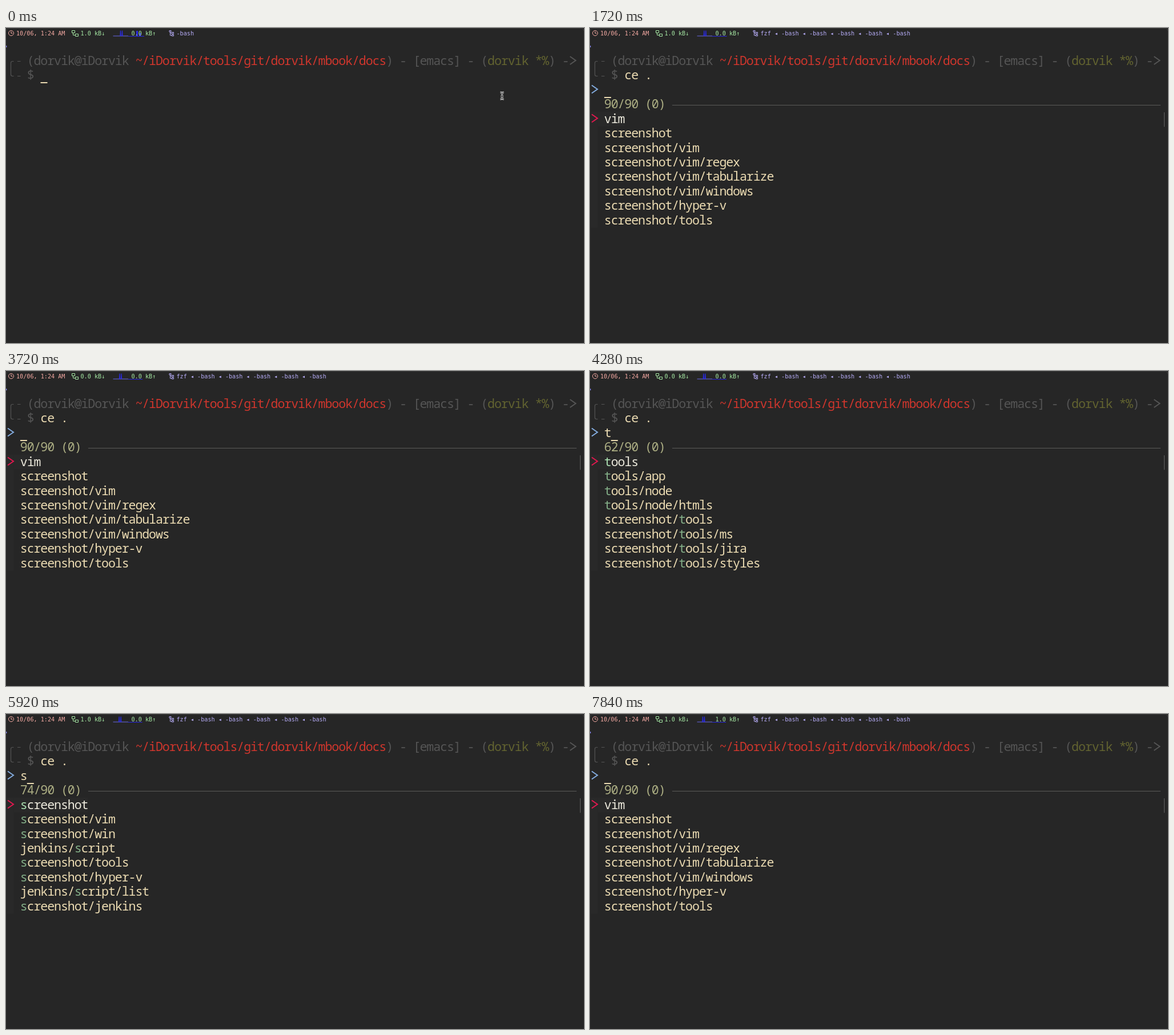
An HTML page with a canvas for the animation above (8000 ms loop, 1012 by 553 pixels).

```html
<!DOCTYPE html>
<html lang="en">
<head>
<meta charset="utf-8">
<title>Fuzzy directory picker</title>
<style>
html, body { margin: 0; width: 100%; height: 100%; overflow: hidden; background: #262626; }
canvas { display: block; }
</style>
</head>
<body>
<canvas id="stage" width="1012" height="553"></canvas>
<script>
const ctx = document.getElementById('stage').getContext('2d');
const LOOP = 8000, CELL = 11.86, LEFT = 1.6, ROW = 25.45, TOP = 45.2;
const TERM_FONT = '500 21.6px "Noto Sans Mono", "DejaVu Sans Mono", monospace';
const BAR_FONT = '10.13px "DejaVu Sans Mono", monospace';
const C = {
  bg: '#262626', raised: '#292929', gray: '#555555', red: '#cf362d', olive: '#626330',
  cream: '#ebdbb2', bright: '#ece9dc', green: '#83ae87', lime: '#aadfb0',
  info: '#acae83', rule: '#5a5a58', blue: '#83acdf', pink: '#e2184f',
  salmon: '#f5aaa3', mint: '#a6e9a4', violet: '#b5abf5', graph: '#2a2ae0'
};

// Edits of the query: start, ms per key, word, +1 typing or -1 deleting
const EDITS = [
  [1800, 86, 'jenkins', 1], [2800, 130, 'jenkins', -1],
  [4240, 80, 'tools', 1], [5520, 70, 'tools', -1],
  [5860, 75, 'script', 1], [6840, 90, 'script', -1]
];
const shots = names => names.split(' ').map(n => 'screenshot/' + n);
const jenkins = names => names.split(' ').map(n => 'jenkins/' + n);
const LISTS = {
  '': ['vim', 'screenshot', ...shots('vim vim/regex vim/tabularize vim/windows hyper-v tools')],
  j: ['jenkins', ...jenkins('config script plugins script/list jenkinsfile ci.jenkins.io script/list/plugins')],
  t: ['tools', 'tools/app', 'tools/node', 'tools/node/htmls', ...shots('tools tools/ms tools/jira tools/styles')],
  s: ['screenshot', ...shots('vim win'), 'jenkins/script', ...shots('tools hyper-v'), 'jenkins/script/list', 'screenshot/jenkins'],
  scri: [...jenkins('script script/list script/list/plugins'), ...shots('vim win jenkins win/powershell jenkins/exception')],
  scrip: [...jenkins('script script/list script/list/plugins'), ...shots('win/powershell jenkins/exception')],
  script: [...jenkins('script script/list script/list/plugins'), ...shots('jenkins/exception')]
};
const COUNTS = {
  '': 90, j: 24, je: 13, t: 62, to: 27, too: 9, tool: 8, tools: 8,
  s: 74, sc: 48, scr: 40, scri: 14, scrip: 5, script: 4
};

const col = n => LEFT + n * CELL;
const rowTop = r => TOP + r * ROW;

// Monospace grid: every glyph is centred in its cell
function grid(text, x, y, step, color) {
  ctx.textAlign = 'center';
  [...text].forEach((ch, i) => {
    ctx.fillStyle = typeof color === 'function' ? color(i) : color;
    if (ch !== ' ') ctx.fillText(ch, x + (i + 0.5) * step, y);
  });
}
function term(text, column, row, color) {
  ctx.font = TERM_FONT;
  grid(text, col(column), rowTop(row) + 19.6, CELL, color);
}
function bar(text, x, color) {
  ctx.font = BAR_FONT;
  grid(text, x, 13, 6.1, color);
}
function rect(x, y, w, h, color) {
  ctx.fillStyle = color;
  ctx.fillRect(x, y, w, h);
}
function path(d, color, width) {
  ctx.strokeStyle = color;
  ctx.lineWidth = width;
  ctx.stroke(new Path2D(d));
}
const chevron = (x, y, color) => path(`M${x} ${y - 7}l10 7l-10 7`, color, 2);
const cursor = (column, row) => rect(col(column) - 0.4, Math.round(rowTop(row + 1)) - 1, 12, 2, C.cream);

function queryAt(t) {
  const edit = EDITS.filter(e => e[0] <= t).pop();
  if (!edit) return '';
  const [start, pace, word, dir] = edit;
  const keys = Math.min(word.length, Math.floor((t - start) / pace) + 1);
  return word.slice(0, dir > 0 ? keys : word.length - keys);
}

function matchSet(item, query) {
  const hits = new Set();
  let at = item.startsWith(query) ? 0 : item.indexOf('/' + query) + 1;
  for (const ch of query) {
    at = item.indexOf(ch, at);
    if (at < 0) break;
    hits.add(at++);
  }
  return hits;
}

function drawStatus(t) {
  path('M4.5 9a4.5 4.5 0 1 0 9 0a4.5 4.5 0 1 0 -9 0M9 6v3.2h2.6', C.salmon, 1);
  bar('10/06, 1:24 AM', 18, C.salmon);

  path('M115.5 4.5h5v4h-5zM121.5 10.5h5v4h-5zM117.5 9v3.5h4', C.mint, 1);
  const down = t < 2520 || (t >= 4920 && t < 6000) || t >= 6960;
  bar((down ? '1.0' : '0.0') + ' kB↓', 130.5, C.mint);

  const x = 200.5 - 0.4 * t / 1000;
  rect(187.5, 13.5, 26.5, 1, '#6868e8');
  rect(214, 14, (t < 560 ? 28 : 26) - t / 4000, 1, C.graph);
  ctx.fillStyle = C.graph;
  for (const dx of [0, 3]) ctx.fill(new Path2D(`M${x + dx - 1.2} 14l.6 -9.5h1.2l.6 9.5z`));
  if (t < 560) rect(228, 5, 3, 9, C.graph), rect(233, 9, 3, 5, C.graph);
  bar((t >= 6960 ? '1.0' : '0.0') + ' kB↑', 219.5, C.mint);

  path('M286 4.5h3v2.5h-3zM287.5 7v6h3M287.5 9h3M290.5 7.5h3v2.5h-3zM290.5 11.5h3v2.5h-3z', C.violet, 1);
  bar(t < 800 ? '-bash' : 'fzf' + ' ◂ -bash'.repeat(5), 298.5, C.violet);
}

function drawPrompt(t) {
  path('M13.5 58.5h-2q-3 0-3 3V81.5q0 3 3 3h2M20 58.5h5.5M20 84.5h5.5', C.gray, 1.2);
  const parts = [
    ['(dorvik@iDorvik ', C.gray],
    ['~/iDorvik/tools/git/dorvik/mbook/docs', C.red],
    [') - [emacs] - (', C.gray],
    ['dorvik *%', C.olive],
    [') -', C.gray]
  ];
  let column = 3;
  for (const [text, color] of parts) {
    term(text, column, 0, color);
    column += text.length;
  }
  chevron(987.5, 57, C.gray);
  term('$', 3, 1, C.gray);
  const typed = 'ce .'.slice(0, t < 40 ? 0 : Math.floor((t - 40) / 120) + 1);
  term(typed, 5, 1, C.cream);
  if (t < 560) cursor(5 + typed.length, 1);
}

function drawPicker(t) {
  const query = queryAt(t), filter = queryAt(t - 40);
  chevron(3, 107.5, C.blue);
  term(query, 2, 2, C.cream);
  if (t >= 720) {
    const count = COUNTS[filter] ?? 11;
    const info = `${count}/90 (0) `;
    const items = LISTS[filter] || LISTS[filter[0]];
    term(info, 2, 3, C.info);
    const ruleX = col(2 + info.length);
    rect(ruleX, 135, 999 - ruleX, 1, C.rule);
    rect(2, 147, CELL, items.length * ROW, C.raised);
    rect(col(1), 147, CELL * (1 + items[0].length), ROW, C.raised);
    chevron(3, 158.5, C.pink);
    items.forEach((item, i) => {
      const hits = matchSet(item, filter);
      const [plain, match] = i ? [C.cream, C.green] : [C.bright, C.lime];
      term(item, 2, 4 + i, n => hits.has(n) ? match : plain);
    });
    if (count > 8) rect(1005, 148, 1, Math.max(1, Math.floor(64 / count)) * ROW, '#626262');
  }
  cursor(2 + query.length, 2);
}

function drawPointer() {
  const beam = 'M865.5 113q3 0 3 2.5v7q0 2.5-3 2.5M871.5 113q-3 0-3 2.5v7q0 2.5 3 2.5M866.5 120h4';
  path(beam, '#e8e8e8', 2.8);
  path(beam, '#161616', 1);
}

function draw(t) {
  rect(0, 0, 1012, 553, C.bg);
  path('M.5 5q0-4.5 4.5-4.5h1002q4.5 0 4.5 4.5', '#393939', 1);
  rect(0, 31, 1.3, 3, '#8686f0');
  drawStatus(t);
  drawPrompt(t);
  if (t >= 640) drawPicker(t);
  else if (t >= 560) cursor(0, 2);
  if (t < 40) drawPointer();
}

function tick(now) {
  draw(now % LOOP);
  requestAnimationFrame(tick);
}
draw(0);
requestAnimationFrame(tick);
</script>
</body>
</html>
```
